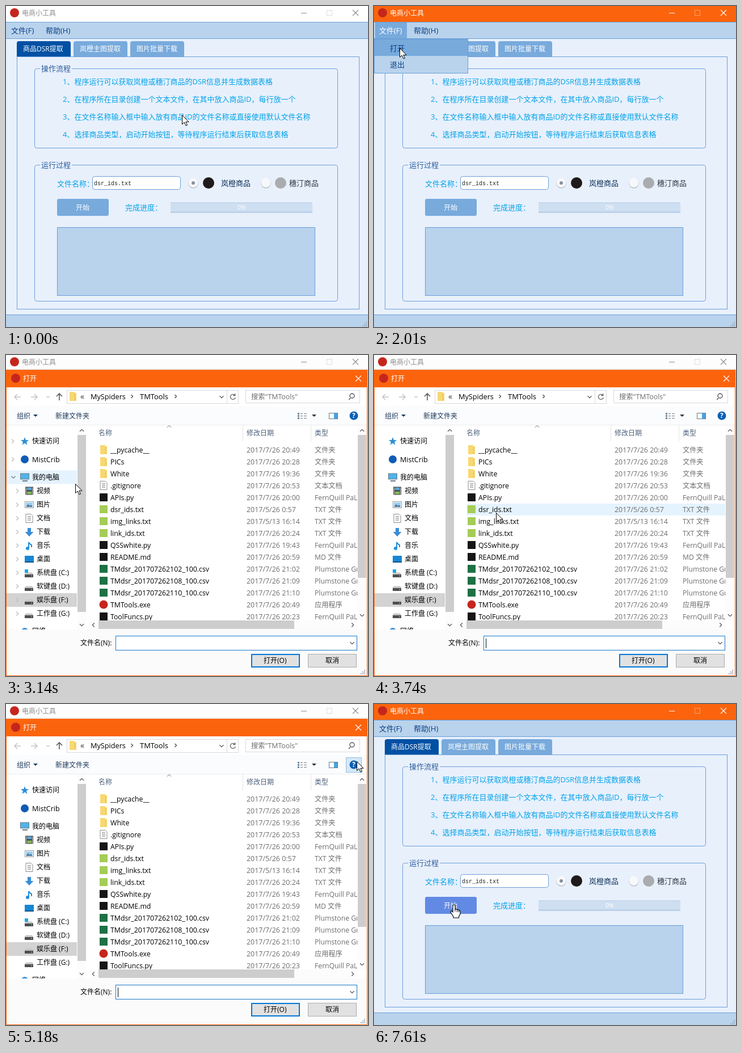
Recreate the animation shown at these times as an HTML page. Size 638 px wide and 566 px high, loop 8 s.

```html
<!DOCTYPE html>
<html lang="zh">
<meta charset="utf-8">
<style>
  html, body { margin: 0; width: 100%; height: 100%; overflow: hidden; background: #fff; }
  svg { display: block; font-family: 'Open Sans', 'Noto Sans CJK SC', 'Noto Sans CJK', sans-serif; white-space: pre; }
</style>
<svg id="stage" width="638" height="566" viewBox="0 0 638 566"></svg>
<script>
const LINE = '#6a9fd8', BAR = '#b9d3ed', BODY = '#e8f0fc', ORANGE = '#fb640d', SKY = '#00a2e8', HOVER = '#e5f3ff';
const TRACK = '#fcfcfc', THUMB = '#cdcdcd';
const stage = document.getElementById('stage');

// Drawing helpers: text is placed by its left edge and vertical centre, on a whole-pixel baseline.
const text = (x, y, s, fill = '#000', size = 12, more = '') =>
  `<text x="${x}" y="${Math.round(y + size * .37)}" font-size="${size}" fill="${fill}" ${more}>${s}</text>`;
const rect = (x, y, w, h, fill, more = '') =>
  `<rect x="${x}" y="${y}" width="${w}" height="${h}" fill="${fill}" ${more}/>`;
const box = (x, y, w, h, fill, stroke, r = 0) =>
  rect(x + .5, y + .5, w, h, fill, `stroke="${stroke}" rx="${r}"`);
const path = (d, stroke, width = 1, fill = 'none') =>
  `<path d="${d}" stroke="${stroke}" stroke-width="${width}" fill="${fill}"/>`;
const dot = (x, y, r, fill) => `<circle cx="${x}" cy="${y}" r="${r}" fill="${fill}"/>`;
const cross = (x, y, stroke) => path(`M${x - 5} ${y - 5}l10 10m0-10l-10 10`, stroke, 1.1);
const chevron = (x, y, dir, stroke = '#555', s = 3.5, width = 1.2) => path({
  up: `M${x - s} ${y + s / 2}l${s} ${-s} ${s} ${s}`,
  down: `M${x - s} ${y - s / 2}l${s} ${s} ${s} ${-s}`,
  left: `M${x + s / 2} ${y - s}l${-s} ${s} ${s} ${s}`,
  right: `M${x - s / 2} ${y - s}l${s} ${s} ${-s} ${s}`
}[dir], stroke, width);
const group = (id, content) => `<g id="${id}">${content}</g>`;
const grip = (x, y) => [0, 1, 2].map(i => [0, 1, 2].slice(0, i + 1)
  .map(j => rect(x - j * 3, y - 6 + i * 3, 2, 2, '#9fb0c2')).join('')).join('');

const titleBar = (bg, ink, dim) => rect(0, 0, 638, 28, bg) + dot(15, 12, 8, '#c4261d') +
  text(28, 12.5, '电商小工具', ink) + path('M520 12.5h10', ink) +
  box(565, 7, 9, 9, 'none', dim) + cross(616, 12, ink);

const frame = (y, h, label) => box(50, y, 534, h, 'none', LINE, 4) +
  rect(60, y - 6, 56, 14, BODY) + text(62, y, label, '#2a5b9c', 13);

const radio = (x, on) => dot(x, 312.8, 8.7, '#bcc3cf') + dot(x, 311.8, 8.2, '#f7f8fa') +
  (on ? dot(x, 312, 3, '#8a909c') : '');

function appWindow() {
  const steps = [
    '1、程序运行可以获取岚橙或穗汀商品的DSR信息并生成数据表格',
    '2、在程序所在目录创建一个文本文件，在其中放入商品ID，每行放一个',
    '3、在文件名称输入框中输入放有商品ID的文件名称或直接使用默认文件名称',
    '4、选择商品类型，启动开始按钮，等待程序运行结束后获取信息表格'
  ];
  const tabs = ['商品DSR提取', '岚橙主图提取', '图片批量下载'];
  return rect(0, 0, 638, 566, BODY) +
    group('idle', titleBar('#fff', '#8c8c8c', '#dcdcdc')) +
    group('active', titleBar(ORANGE, '#fff', '#fda06b')) +
    rect(0, 28, 638, 30, BAR) + path('M0 28.5h638M0 57.5h638', LINE) +
    text(9, 43, '文件(F)', '#0a3f83', 13) + text(70, 43, '帮助(H)', '#0a3f83', 13) +
    box(19, 89, 603, 445, BODY, LINE) +
    tabs.map((s, i) => `<path d="M${19 + i * 100} 89v-23q0-4 4-4h87q4 0 4 4v23z" fill="${i ? '#78aadc' : '#0050a4'}"/>` +
      text(30 + i * 100, 76, s, '#fff')).join('') +
    frame(110, 140, '操作流程') +
    steps.map((s, i) => text(100, 133 + i * 31, s, SKY, 13)).join('') +
    frame(280, 240, '运行过程') +
    text(90, 313, '文件名称：', SKY, 13) + box(152, 300, 155, 23, '#fff', LINE, 4) +
    text(155, 312.5, 'dsr_ids.txt', '#222', 10, 'font-family="Liberation Mono, monospace"') +
    radio(330, true) + dot(357, 312, 10, '#211a1a') + text(379, 312.5, '岚橙商品', '#0b2f55', 13) +
    radio(458, false) + dot(484, 312, 10, '#a9abae') + text(499, 312.5, '穗汀商品', '#2b3440', 13) +
    rect(90, 340, 91, 30, '#78aadc', 'rx="3" id="start"') + text(123, 355.5, '开始', '#fff') +
    text(210, 355.5, '完成进度：', SKY, 13) +
    rect(290, 346, 250, 19, '#cfdff2') + rect(290, 362, 250, 3, '#bcd1e9') + rect(290, 346, 250, 2, '#c5d7ee') +
    text(408, 355.5, '0%', '#fff', 10.5) +
    box(90, 390, 454, 120, BAR, LINE) +
    rect(0, 544, 638, 22, BAR) + path('M0 544.5h638', LINE) + grip(634, 563);
}

const menu = () => rect(2, 29, 56, 28, '#78aadc') + text(9, 43, '文件(F)', '#fff', 13) +
  box(0, 58, 165, 60, BAR, LINE) + rect(1, 59, 164, 29, '#78aadc', 'id="menuHover"') +
  text(28, 74, '打开', '#0a3f83', 13) + text(28, 103, '退出', '#0a3f83', 13);

const folder = (x, y) => path(`M${x - 6} ${y - 8}h9v2h3v14h-12z`, 'none', 0, '#f7d873') +
  path(`M${x + 3.5} ${y - 5}v12`, '#e6bf55');
const page = (x, y) => path(`M${x - 6} ${y - 7.5}h9l3 3v12h-12z`, '#8c8c8c', 1, '#fff') +
  path(`M${x - 3} ${y - 3}h6m-6 3h6m-6 3h6`, '#777');
const square = fill => (x, y) => rect(x - 7, y - 7, 14, 14, fill);
const screen = (x, y) => box(x - 8, y - 7, 15, 10, '#4fb4ea', '#6c7a86') + path(`M${x - 4} ${y + 6.5}h9`, '#6c7a86', 2);
const drive = (x, y) => path(`M${x - 6} ${y}h11l2 3h-15z`, '#aaa', .5, '#ccc') + rect(x - 8, y + 3, 15, 5, '#4c4f52') +
  rect(x + 3, y + 5, 2, 1, '#6f6');

const kinds = {
  dir: [folder, '文件夹'],
  doc: [page, '文本文档'],
  py: [square('#161616'), 'FernQuill PaLoom'],
  txt: [square('#a4cc58'), 'TXT 文件'],
  md: [square('#161616'), 'MD 文件'],
  csv: [square('#1e7145'), 'Plumstone Grid'],
  exe: [(x, y) => dot(x, y, 7.5, '#c4261d'), '应用程序']
};
const files = [
  ['dir', '__pycache__', '7/26 20:49'], ['dir', 'PICs', '7/26 20:28'], ['dir', 'White', '7/26 19:36'],
  ['doc', '.gitignore', '7/26 20:53'], ['py', 'APIs.py', '7/26 20:00'], ['txt', 'dsr_ids.txt', '5/26 0:57'],
  ['txt', 'img_links.txt', '5/13 16:14'], ['txt', 'link_ids.txt', '7/26 20:24'], ['py', 'QSSwhite.py', '7/26 19:43'],
  ['md', 'README.md', '7/26 20:59'], ['csv', 'TMdsr_201707262102_100.csv', '7/26 21:02'],
  ['csv', 'TMdsr_201707262108_100.csv', '7/26 21:09'], ['csv', 'TMdsr_201707262110_100.csv', '7/26 21:10'],
  ['exe', 'TMTools.exe', '7/26 20:49'], ['py', 'ToolFuncs.py', '7/26 20:23']
];
const ROW = 21, ROWS_TOP = 157;

const star = (x, y) => path(`M${x} ${y - 7}l2 5h5l-4 3.5 1.5 5-4.5-3-4.5 3 1.5-5-4-3.5h5z`, 'none', 0, '#2f8fd8');
const film = (x, y) => rect(x - 7, y - 7, 14, 14, '#333') + rect(x - 4, y - 6, 8, 5, '#5aa7d8') + rect(x - 4, y + 1, 8, 5, '#86b95c') +
  path(`M${x - 5.5} ${y - 6}v13m11-13v13`, '#ddd', 1.2);
const photo = (x, y) => box(x - 8, y - 6, 15, 11, '#fff', '#999') + rect(x - 6, y - 4, 12, 8, '#9fd0f2') +
  path(`M${x - 6} ${y + 4}l4-5 3 3 2-2 3 4z`, 'none', 0, '#4a7d9c');
const down = (x, y) => path(`M${x - 3} ${y - 7}h6v7h4.5l-7.5 8-7.5-8h4.5z`, 'none', 0, '#3a8ed8');
const note = (x, y) => path(`M${x - 1} ${y + 5}v-11q1 3 5 5v4`, '#1e8fe0', 2) + dot(x - 3, y + 5, 3, '#1e8fe0');
const desk = (x, y) => rect(x - 8, y - 6, 16, 12, '#1787d4') + rect(x - 8, y + 4, 16, 2, '#0b5688');
const places = [
  [152, '快速访问', star], [184, 'MistCrib', (x, y) => dot(x, y, 7, '#0f5bb5')], [215.5, '我的电脑', screen],
  [239.5, '视频', film], [264, '图片', photo], [288, '文档', page], [312, '下载', down], [336, '音乐', note],
  [360, '桌面', desk], [384, '系统盘 (C:)', (x, y) => drive(x, y) + rect(x - 8, y - 6, 6, 6, '#1aa9e8')],
  [408, '软键盘 (D:)', drive], [432, '娱乐盘 (F:)', drive], [456, '工作盘 (G:)', drive],
  [487, '网络', (x, y) => dot(x, y, 6, '#3a8ed8')]
];
const isTop = i => i < 3 || i === 13;

function dialog() {
  const gray = '#6d6d6d', head = '#4c607a', navy = '#1e395b';
  return titleBar('#fdfdfd', '#8c8c8c', '#dcdcdc') + rect(0, 24, 638, 2, '#ececec') +
    rect(0, 26, 638, 540, '#fff') + rect(0, 26, 637, 31, ORANGE) + dot(17, 41, 8, '#c4261d') + text(30, 42, '打开', '#fff') +
    rect(605, 27, 31, 29, '#e81123', 'id="closeHover"') + cross(621, 41.5, '#fff') +
    // Address row
    path('M26 74h-11m5-5l-5 5 5 5', '#c4c4c4', 1.5) + path('M44 74h11m-5-5l5 5-5 5', '#c4c4c4', 1.5) +
    chevron(74, 74, 'down', '#c4c4c4', 2.5) + path('M94 80v-12m-5 5l5-5 5 5', '#5a5a5a', 1.6) +
    box(107, 62, 302, 23, '#fff', '#d9d9d9') + path('M389.5 62v24', '#d9d9d9') + folder(118, 73) +
    text(131, 73, '«', '#333', 14) + text(149, 73, 'MySpiders', '#000', 12.7) + chevron(222, 73, 'right', '#444', 3) +
    text(236, 73, 'TMTools', '#000', 12.9) + chevron(299, 73, 'right', '#444', 3) + chevron(380, 74, 'down') +
    path('M403.5 71a4.5 4.5 0 1 0 .8 4m-.6-7v3.5h-3.5', '#666', 1.3) +
    box(422, 62, 201, 22, '#fff', '#d9d9d9') + text(432, 73.5, '搜索"TMTools"', gray, 12.3) +
    path('M607 76l-3 3M614 72a4 4 0 1 1-8 0a4 4 0 1 1 8 0', '#555', 1.4) +
    // Tool row
    rect(1, 90, 635, 33, '#fbfcfd') + path('M1 123.5h635', '#ececec') +
    text(19, 107.5, '组织', navy) + path('M48 105h8l-4 4z', 'none', 0, navy) + text(87, 107.5, '新建文件夹', navy) +
    [102, 106, 110].map(y => rect(514, y, 3, 3, '#6f8aa5') + rect(519, y + 1, 4, 1, '#777') + rect(525, y + 1, 5, 1, '#777')).join('') +
    path('M539 105h8l-4 4z', 'none', 0, '#333') +
    box(569, 102, 15, 10, '#fff', '#5f7c99') + rect(578, 103, 6, 9, '#4aa3d9') +
    group('helpHover', box(599, 94, 27, 26, '#d5e8f7', '#8fc0e6')) + dot(613, 107, 7.5, '#0b5fb4') +
    text(610, 107, '?', '#fff', 12, 'font-weight="700"') +
    // Places
    rect(1, 420, 124, 24, '#d3d3d3') + rect(1, 172, 124, 24, HOVER, 'id="placeHover"') +
    group('twisties', places.map(([y], i) => i === 2 ? chevron(13, y, 'down', '#777') :
      chevron(isTop(i) ? 12 : 20, y, 'right', '#bbb')).join('')) +
    places.map(([y, s, icon], i) => icon(isTop(i) ? 33 : 41, y) + text(isTop(i) ? 46 : 54, y, s, '#000', i === 1 ? 12.5 : 12)).join('') +
    rect(126, 124, 15, 360, TRACK) + rect(126, 141, 15, 312, THUMB) +
    chevron(133.5, 133, 'up') + chevron(133.5, 476, 'down') +
    // File list
    text(163, 138, '名称', head) + text(424, 138, '修改日期', head) + text(544, 138, '类型', head) +
    chevron(287.5, 126, 'up', '#666', 3.5, 1) + path('M417.5 124v28M537.5 124v28', '#e5e5e5') +
    rect(163, 0, 456, ROW, HOVER, 'id="rowHover"') +
    files.map(([kind, name, date], i) => {
      const y = ROWS_TOP + 10.5 + i * ROW, [icon, label] = kinds[kind];
      return icon(172, y - .5) + text(184, y, name, '#000', 12.3) + text(424, y, '2017/' + date, gray, 12.45) + text(544, y, label, gray, 12.2);
    }).join('') +
    rect(619, 124, 19, 360, '#fff') + rect(620, 124, 15, 344, TRACK) + rect(620, 141, 15, 252, THUMB) +
    chevron(627.5, 133, 'up') + chevron(627.5, 459, 'down') +
    rect(147, 468, 472, 16, TRACK) + rect(163, 468, 345, 15, THUMB) +
    chevron(154, 476, 'left') + chevron(611, 476, 'right') +
    // Footer
    rect(1, 484, 635, 81, '#fbfbfb') + text(131, 508, '文件名(N):') +
    box(193, 495, 425, 25, '#fff', '#1979ca') + rect(197, 500, 1, 17, '#000', 'id="caret"') +
    chevron(610, 508, 'down') +
    rect(433, 528, 84, 22, '#e1e1e1', 'stroke="#0078d7" stroke-width="2"') + text(454, 539, '打开(O)') +
    box(532, 527, 85, 23, '#e1e1e1', '#adadad') + text(563, 539, '取消') + grip(631, 561) +
    path('M.5 57V565.5H636.5V57', ORANGE) + rect(637, 26, 1, 540, '#dccfc8');
}

stage.innerHTML = appWindow() + group('menu', menu()) + group('dialog', dialog()) +
  group('cursor',
    group('arrow', path('M.5.5V16.5L4.2 13L7 19L9.5 18L6.8 12.3H12Z', '#000', 1, '#fff')) +
    group('hand', path('M-2 2a2 2 0 0 1 4 0V8Q5 7 5.5 9Q8 8 8.5 10Q11 9.5 11 12V16L8.5 21V23H-1V21L-6 13Q-6 10.5-4 11L-2 13Z', '#000', 1.1, '#fff') +
      path('M2 8v4M5.5 9v4M8.5 10v3', '#000')));

const el = id => document.getElementById(id);
const show = (id, on) => el(id).style.opacity = +on;
const clamp = v => Math.max(0, Math.min(1, v));

// Pointer route: time, x, y
const route = [
  [0, 310, 192], [30, 310, 192], [260, 460, 200], [560, 175, 228], [830, 296, 225], [1000, 293, 224],
  [1600, 24, 46], [1710, 24, 46], [1960, 45, 74], [2190, 45, 74], [2590, 114, 197], [3000, 112, 222],
  [3740, 215, 278], [3850, 216, 280], [4250, 400, 410], [4560, 612, 440], [4700, 622, 400], [5180, 618, 101],
  [5350, 622, 42], [5500, 622, 42], [6060, 324, 265], [6210, 324, 265], [6880, 155, 353], [7190, 155, 353],
  [7380, 207, 310], [7600, 141, 354], [8000, 141, 354]
];
function pointer(t) {
  const i = route.findIndex(p => p[0] > t), [t0, x0, y0] = route[i - 1], [t1, x1, y1] = route[i];
  const u = (t - t0) / (t1 - t0), e = u * u * (3 - 2 * u);
  return [x0 + (x1 - x0) * e, y0 + (y1 - y0) * e];
}

function draw(t) {
  const [x, y] = pointer(t);
  const within = (l, top, r, b) => x >= l && x < r && y >= top && y < b;
  const fade = clamp((t - 2190) / 120) * clamp((5640 - t) / 120);

  show('active', t >= 1640 && t < 2190 || t >= 5520);
  show('menu', t >= 1650 && t < 2030);
  show('menuHover', within(0, 58, 166, 88));
  show('dialog', fade);
  show('closeHover', within(605, 27, 637, 57));
  show('helpHover', within(599, 94, 628, 122));
  show('twisties', clamp((165 - x) / 25));
  show('caret', t > 2550 && (t - 2550) % 1060 < 530);

  const place = places.find(p => Math.abs(p[0] - y) <= 13);
  show('placeHover', place && x < 126);
  if (place) el('placeHover').setAttribute('y', place[0] - 12);
  const row = Math.floor((y - ROWS_TOP) / ROW);
  show('rowHover', x > 160 && x < 619 && row >= 0 && y < 468);
  el('rowHover').setAttribute('y', ROWS_TOP + row * ROW);

  const onStart = t > 5640 && within(90, 340, 181, 370);
  el('start').setAttribute('fill', onStart ? '#628ae4' : '#78aadc');
  show('hand', onStart);
  show('arrow', !onStart);
  el('cursor').setAttribute('transform', `translate(${Math.round(x)} ${Math.round(y)})`);
}

const begin = performance.now();
function tick() {
  draw((performance.now() - begin) % 8000);
  requestAnimationFrame(tick);
}
tick();
</script>
</html>
```
